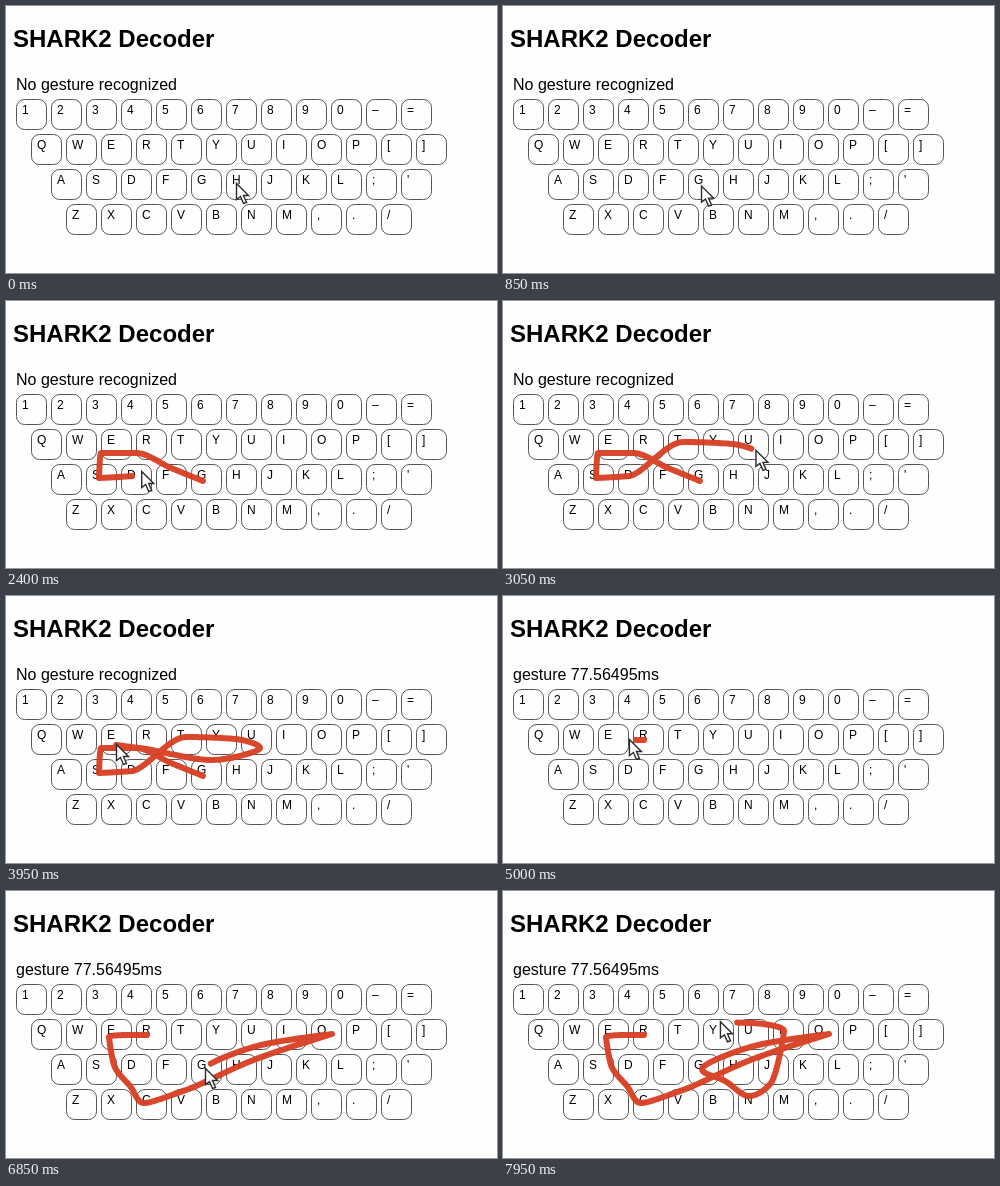
An HTML page with a canvas for the animation above (8000 ms loop, 491 by 267 pixels).

```html
<!DOCTYPE html>
<html lang="en">
<head>
<meta charset="utf-8">
<title>Gesture keyboard</title>
<style>
  html, body { margin: 0; width: 100%; height: 100%; overflow: hidden; background: #fefefe; }
  body { position: relative; color: #000; font-family: "Liberation Sans", Arial, sans-serif; }
  canvas { position: absolute; left: 0; top: 0; }
  h1, p { position: absolute; margin: 0; white-space: nowrap; }
  h1 { left: 7px; top: 19px; font-size: 24px; line-height: 28px; }
  p { left: 10px; top: 69px; font-size: 16px; line-height: 19px; }
</style>
</head>
<body>
<canvas id="stage" width="491" height="267"></canvas>
<h1>SHARK2 Decoder</h1>
<p id="status">No gesture recognized</p>
<script>
const LOOP = 8000, STEP = 50, LAG = 50, DECODED = 4150;
const ctx = document.getElementById("stage").getContext("2d");
const status = document.getElementById("status");

const rows = [
  [10, "1234567890–="],
  [25, "QWERTYUIOP[]"],
  [45, "ASDFGHJKL;'"],
  [60, "ZXCVBNM,./"]
];

// Each swipe passes through its points at a steady beat
const swipe = (start, beat, path) =>
  ({ start, beat, points: path.split(" ").map(pair => pair.split(",").map(Number)) });
const first = swipe(1100, 250,
  "197,180 165,167 130,152 95,152 93,177 126,175 180,141 229,143 254,152 205,164 140,153 110,149");
const second = swipe(4850, 200,
  "141,144 120,144 103,146 108,174 124,195 138,212 180,199 250,168 326,143 " +
  "255,154 199,178 222,190 246,205 268,192 281,140 248,132 196,131");

const clamp = u => Math.min(1, Math.max(0, u));
const smooth = u => u * u * (3 - 2 * u);

// Harmonic slope: smooth through a run, flat at a turn
function slope(a, b, c) {
  const before = b - a, after = c - b;
  return before * after > 0 ? 2 * before * after / (before + after) : 0;
}

function swipeAt({ start, beat, points }, time) {
  const last = points.length - 1;
  const position = Math.min(last, Math.max(0, (time - start) / beat));
  const i = Math.min(last - 1, Math.floor(position)), u = position - i;
  const point = k => points[Math.min(last, Math.max(0, k))];
  return [0, 1].map(axis => {
    const [a, b, c, d] = [i - 1, i, i + 1, i + 2].map(k => point(k)[axis]);
    return b + (c - b) * smooth(u)
      + u * (1 - u) * ((1 - u) * slope(a, b, c) - u * slope(b, c, d));
  });
}

// Eased move between two places, swinging out by the given bulge
function glide(from, to, u, bulge) {
  return from.map((v, axis) =>
    v + (to[axis] - v) * smooth(u) + bulge[axis] * Math.sin(Math.PI * u));
}

function pointerAt(time) {
  if (time < first.start) return glide([230, 178], first.points[0], clamp(time / 950), [0, 2]);
  if (time < DECODED) return swipeAt(first, time);
  if (time >= second.start) return swipeAt(second, time);
  return glide(first.points.at(-1), second.points[0], clamp((time - 4450) / 300), [36, 5]);
}

function drawKeys() {
  ctx.lineWidth = 1;
  ctx.strokeStyle = "#555";
  ctx.fillStyle = "#000";
  ctx.font = '12px "Liberation Sans", Arial, sans-serif';
  rows.forEach(([left, labels], row) => {
    [...labels].forEach((label, column) => {
      const x = left + column * 35, y = 93 + row * 35;
      ctx.beginPath();
      ctx.roundRect(x + 0.5, y + 0.5, 30, 30, 8);
      ctx.stroke();
      ctx.fillText(label, x + 6, y + 15);
    });
  });
}

function drawTrace(gesture, end) {
  if (end <= gesture.start) return;
  ctx.beginPath();
  for (let time = gesture.start; time <= end; time += 10) ctx.lineTo(...swipeAt(gesture, time));
  ctx.lineWidth = 6;
  ctx.lineCap = ctx.lineJoin = "round";
  ctx.strokeStyle = "rgba(215, 62, 34, 0.95)";
  ctx.stroke();
}

function drawPointer([x, y]) {
  ctx.save();
  ctx.translate(x + 0.5, y - 0.5);
  const arrow = new Path2D("M0 0V16L4 13L7 20L10 19L7 12H12Z");
  ctx.fillStyle = "#fff";
  ctx.fill(arrow);
  ctx.lineWidth = 1.4;
  ctx.lineJoin = "miter";
  ctx.strokeStyle = "#2a2a2a";
  ctx.stroke(arrow);
  ctx.restore();
}

function render(now) {
  const time = Math.floor(now % LOOP / STEP) * STEP;
  const decoded = time >= DECODED;
  const text = decoded ? "gesture 77.56495ms" : "No gesture recognized";
  if (status.textContent !== text) status.textContent = text;
  ctx.clearRect(0, 0, 491, 267);
  drawKeys();
  drawTrace(decoded ? second : first, time - LAG);
  drawPointer(pointerAt(time));
}

const started = performance.now();
function tick() {
  render(performance.now() - started);
  requestAnimationFrame(tick);
}
tick();
</script>
</body>
</html>
```
